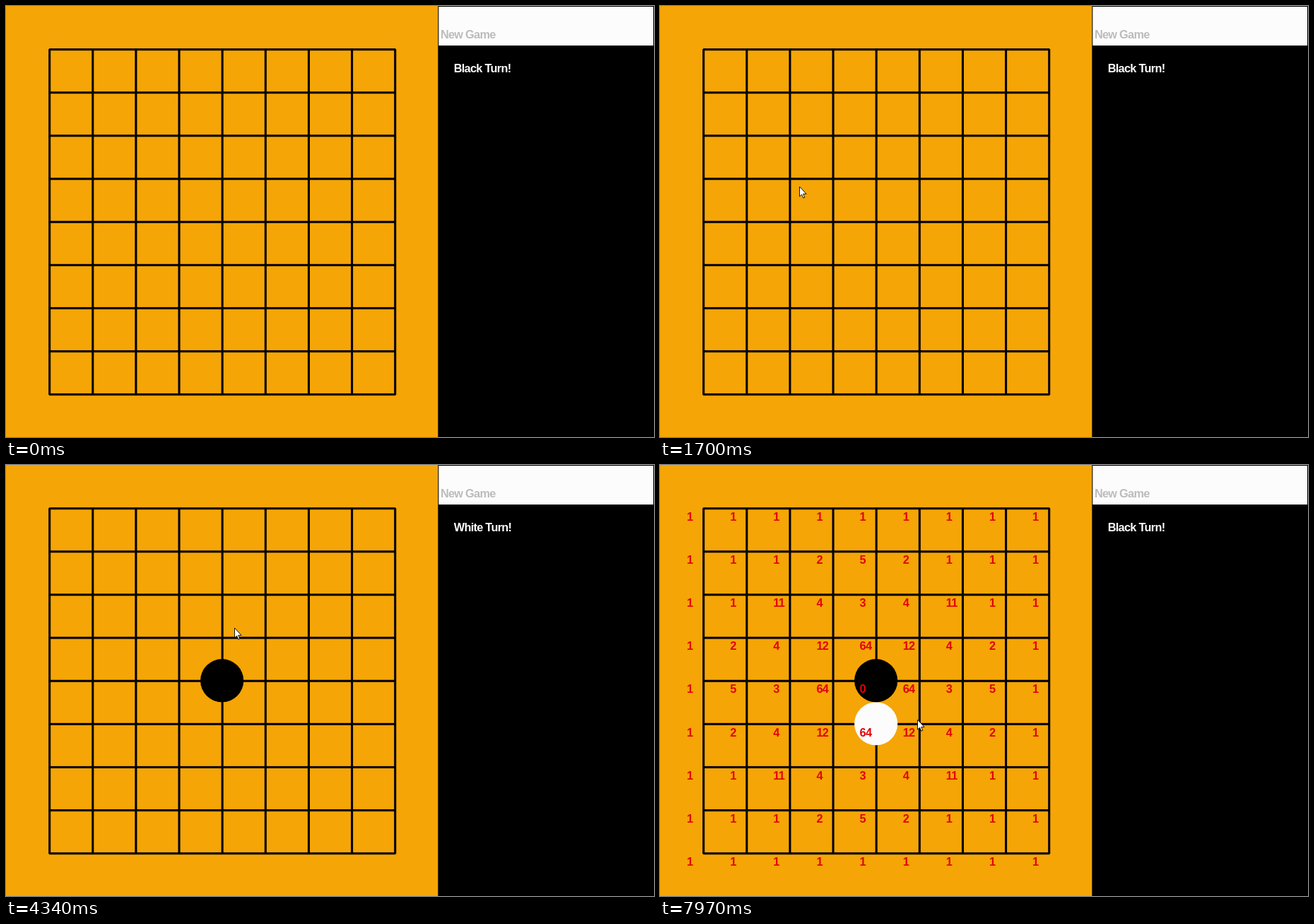
An HTML page with a canvas for the animation above (8 s loop, 917 by 611 pixels).

```html
<!DOCTYPE html>
<html lang="en">
<head>
<meta charset="utf-8">
<title>Board game</title>
<style>
html, body { margin: 0; width: 100%; height: 100%; overflow: hidden; background: #000; }
canvas { display: block; }
</style>
</head>
<body>
<canvas id="stage" width="917" height="611"></canvas>
<script>
const ctx = document.getElementById('stage').getContext('2d');
const LOOP = 8000, CELL = 60;
const SCALE = 917 / 900; // the board is laid out on 900 x 600 units
const BLACK_MOVE = 2070, SCORES_SHOWN = 6500, WHITE_MOVE = 6540;

// Pointer moves: start time, end time, destination
const ENTER = { x: 9, y: 173 };
const moves = [
  [1240, 1970, 306, 304],
  [2070, 2400, 347, 259],
  [2400, 2800, 372, 200],
  [3020, 3100, 338, 240],
  [3200, 3240, 341, 231],
  [3240, 3600, 356, 229],
  [3710, 3800, 323, 231],
  [6800, 7270, 364, 361]
];

function pointerAt(t) {
  let { x, y } = ENTER;
  for (const [from, to, toX, toY] of moves) {
    const k = Math.min(1, Math.max(0, (t - from) / (to - from)));
    x += (toX - x) * k;
    y += (toY - y) * k;
  }
  return [Math.round(x), Math.round(y)];
}

// A point's score depends on its squared distance from the black stone
const scoreByDistance = { 0: 0, 1: 64, 2: 12, 4: 3, 5: 4, 8: 11, 9: 5, 10: 2 };
const score = (col, row) => scoreByDistance[(col - 4) ** 2 + (row - 4) ** 2] ?? 1;

function rect(x, y, w, h, color) {
  ctx.fillStyle = color;
  ctx.fillRect(x, y, w, h);
}

function text(str, x, y, color) {
  ctx.fillStyle = color;
  ctx.fillText(str, x, y);
}

function stone(col, row, color) {
  ctx.fillStyle = color;
  ctx.beginPath();
  ctx.arc(col * CELL, row * CELL, 30, 0, Math.PI * 2);
  ctx.fill();
}

const arrow = new Path2D('M.5 0V14L3.6 11.2L5.8 16.2L7.8 15.3L5.7 10.4H10Z');

function drawPointer(x, y) {
  ctx.setTransform(1, 0, 0, 1, x, y);
  ctx.fillStyle = '#fff';
  ctx.fill(arrow);
  ctx.strokeStyle = '#000';
  ctx.lineWidth = 0.9;
  ctx.stroke(arrow);
}

function draw(t) {
  ctx.setTransform(SCALE, 0, 0, SCALE, 0, 0);
  rect(0, 0, 900, 600, '#000');
  rect(0, 0, 600, 600, '#f5a506');
  for (let i = 1; i <= 9; i++) {
    const p = i * CELL - 1;
    rect(p, CELL, 3, 8 * CELL + 1, '#000');
    rect(CELL, p, 8 * CELL + 1, 3, '#000');
  }
  rect(601, 1, 298, 54, '#fcfcfc');

  ctx.font = 'bold 16px "Liberation Sans", Arial, sans-serif';
  ctx.letterSpacing = '-0.7px';
  text('New Game', 603.5, 45, '#bcbcbc');
  const whiteTurn = t >= BLACK_MOVE && t < SCORES_SHOWN;
  text(whiteTurn ? 'White Turn!' : 'Black Turn!', 622, 92.3, '#fcfcfc');

  if (t >= BLACK_MOVE) stone(5, 5, '#000');
  if (t >= WHITE_MOVE) stone(5, 6, '#fcfcfc');
  if (t >= SCORES_SHOWN) {
    for (let row = 0; row < 9; row++)
      for (let col = 0; col < 9; col++)
        text(score(col, row), 37.3 + col * CELL, 77.5 + row * CELL, '#e20308');
  }
  if (t >= moves[0][0]) drawPointer(...pointerAt(t));
}

const start = performance.now();
function tick() {
  draw((performance.now() - start) % LOOP);
  requestAnimationFrame(tick);
}
tick();
</script>
</body>
</html>
```
